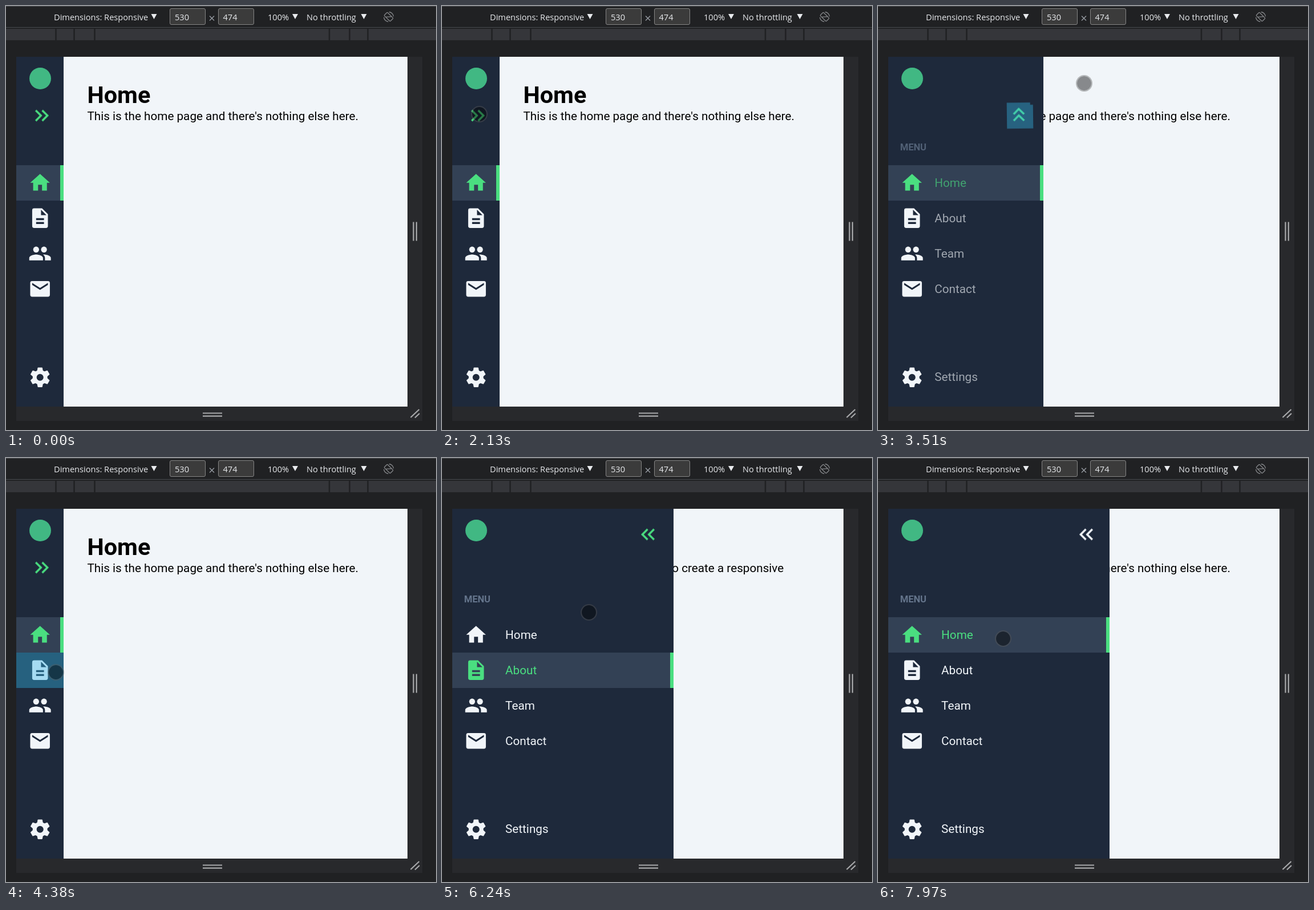
An HTML page that plays this animation: 754x743 px, repeating every 8000 ms.

```html
<!DOCTYPE html>
<html lang="en">
<head>
<meta charset="utf-8">
<title>Responsive sidebar</title>
<style>
@property --open { syntax: "<number>"; inherits: true; initial-value: 0; }
@property --turn { syntax: "<number>"; inherits: true; initial-value: 0; }
@property --label { syntax: "<number>"; inherits: true; initial-value: 0; }

html, body { margin: 0; width: 100%; height: 100%; overflow: hidden; background: #202123; }
.stage {
  position: relative; width: 754px; height: 743px; overflow: hidden;
  font: 20.7px/24px Roboto, sans-serif;
  animation: open 8s ease-in-out infinite,
             turn 8s cubic-bezier(.333, .4, .667, .77) infinite,
             label 8s ease-in-out infinite;
}
.stage * { box-sizing: border-box; }
.chrome { position: absolute; left: 0; top: 0; font: 14.6px "Open Sans", sans-serif; fill: #e8eaed; }

.page { position: absolute; left: 18px; top: 89px; width: 686px; height: 612.5px; background: #f1f5f9; color: #000; overflow: hidden; }
.view { position: absolute; left: 124.4px; top: 43px; white-space: nowrap; }
.view h1 { margin: 0; font-size: 41.4px; line-height: 48px; }
.view p { margin: .5px 0 0; }
.first-view { animation: first-view 8s step-end infinite; }
.second-view { animation: second-view 8s step-end infinite; }

.sidebar {
  position: absolute; left: 0; top: 0; height: 100%;
  width: calc(82.8px + 305.5px * var(--open));
  background: #1e293b; color: #f1f5f9; overflow: hidden;
}
.logo { position: absolute; left: 22.5px; top: 19px; width: 38px; height: 38px; border-radius: 50%; background: #41b883; }
.label { position: absolute; left: 20.7px; top: 147px; font-size: 16.5px; font-weight: 700; color: #64748b; opacity: var(--label); }
.row {
  position: absolute; left: 0; width: 100%; height: 62.1px; padding-left: 20.7px;
  display: flex; align-items: center; white-space: nowrap; border-right: 6px solid transparent;
}
.row svg { flex: none; width: 41.4px; height: 41.4px; fill: currentColor; }
.row span { margin-left: calc(31px * var(--open)); opacity: var(--open); }
.row::after { content: ""; position: absolute; inset: 0 -6px 0 0; background: #33b5e5; opacity: 0; }
.first-row { animation: first-row 8s ease-out infinite; }
.second-row { animation: second-row 8s ease-out infinite; }
.first-row::after { animation: first-tap 8s step-end infinite; }
.second-row::after { animation: second-tap 8s step-end infinite; }

.toggle {
  position: absolute; right: 18.4px; width: 46px; height: 46px; margin-top: -23px; overflow: visible;
  transform: rotate(calc(-180deg * var(--turn)));
  animation: lift 8s step-end infinite;
}
.chevrons { animation: hover 8s ease-out infinite; }
.toggle .tap { fill: #33b5e5; opacity: 0; animation: toggle-tap 8s step-end infinite; }

.cursor {
  position: absolute; left: -14.5px; top: -14.5px; width: 29px; height: 29px; border-radius: 50%;
  background: rgba(0, 0, 0, .44); background-clip: padding-box; border: 2.5px solid rgba(90, 90, 90, .4);
  animation: cursor 8s ease-in-out infinite, appear 8s step-end infinite;
}

@keyframes open {
  0%, 27.425% { --open: 0; } 29.925%, 42.815% { --open: 1; }
  45.315%, 66.735% { --open: 0; } 69.235%, 100% { --open: 1; }
}
@keyframes turn {
  0%, 27.425% { --turn: 0; } 29.925%, 42.8% { --turn: 1; }
  45.3%, 66.75% { --turn: 0; } 69.25%, 100% { --turn: 1; }
}
@keyframes label {
  0%, 27.425% { --label: 0; } 30.55%, 42.8% { --label: 1; }
  45.925%, 66.75% { --label: 0; } 69.875%, 100% { --label: 1; }
}
@keyframes lift { 0% { top: 105px; } 27.425% { top: 43px; } 42.8% { top: 105px; } 66.75%, 100% { top: 43px; } }
@keyframes hover {
  0%, 55%, 68.1%, 94% { fill: #4ade80; transform: translateX(4px); }
  57.5%, 66.2%, 96.5%, 100% { fill: #f1f5f9; transform: translateX(0); }
}
@keyframes toggle-tap {
  0%, 29.4%, 44.9%, 69%, 100% { opacity: 0; }
  27.4%, 42.7%, 66.77% { opacity: .4; }
}
@keyframes first-tap { 0%, 96%, 100% { opacity: 0; } 93.75% { opacity: .4; } }
@keyframes second-tap { 0%, 56.8%, 100% { opacity: 0; } 54.5% { opacity: .4; } }
@keyframes first-row {
  0%, 55%, 96.5%, 100% { background: #334155; color: #4ade80; border-color: #4ade80; }
  57.5%, 94% { background: #1e293b; color: #f1f5f9; border-color: #1e293b; }
}
@keyframes second-row {
  0%, 55%, 96.5%, 100% { background: #1e293b; color: #f1f5f9; border-color: #1e293b; }
  57.5%, 94% { background: #334155; color: #4ade80; border-color: #4ade80; }
}
@keyframes first-view { 0%, 94%, 100% { opacity: 1; } 55% { opacity: 0; } }
@keyframes second-view { 0%, 94%, 100% { opacity: 0; } 55% { opacity: 1; } }
@keyframes appear { 0% { opacity: 0; } 2.375%, 100% { opacity: 1; } }
@keyframes cursor {
  0%, 2.375% { transform: translate(449px, 714px); animation-timing-function: ease-out; }
  12.25% { transform: translate(116px, 320px); animation-timing-function: linear; }
  14.125% { transform: translate(110px, 298px); animation-timing-function: linear; }
  18.75% { transform: translate(56px, 208px); }
  22.5% { transform: translate(65px, 187px); }
  22.875%, 30.6% { transform: translate(65px, 189px); }
  39.4%, 45% { transform: translate(361px, 135px); animation-timing-function: ease-in; }
  46.6% { transform: translate(345px, 153px); animation-timing-function: ease-out; }
  53.75%, 56.6% { transform: translate(87px, 375px); }
  62.5% { transform: translate(68px, 156px); }
  66.75%, 69.75% { transform: translate(67px, 195px); }
  76.4%, 77.9% { transform: translate(257px, 270px); }
  84.5%, 86.25% { transform: translate(365px, 146px); }
  90.25%, 96.25% { transform: translate(204px, 317px); }
  99.6%, 100% { transform: translate(219px, 316px); }
}
</style>
</head>
<body>
<div class="stage">
  <svg class="chrome" width="754" height="743">
    <path fill="#202123" d="M0 0H754V743H0z"/>
    <path fill="#494c50" d="M0 0H754V1H0zM0 37H754V38H0z"/>
    <path fill="#35363a" d="M0 40H754V60H0z"/>
    <path stroke="#202123" stroke-width="2.5" d="M87.5 40v20M119.5 40v20M155.5 40v20M567 40v20M602.5 40v20M634.5 40v20"/>
    <path fill="#28292c" d="M18 89H730V727H18z"/>
    <text x="84" y="25">Dimensions: Responsive</text>
    <g fill="#3b3b3b" stroke="#858585">
      <rect x="287.5" y="4.5" width="62" height="28" rx="2.5"/>
      <rect x="372.5" y="4.5" width="62" height="28" rx="2.5"/>
    </g>
    <text x="296" y="25">530</text>
    <text x="380.5" y="25">474</text>
    <path stroke="#9aa0a6" stroke-width="1.3" d="M357 17.5l8 8m0-8l-8 8"/>
    <text x="459" y="25">100%</text>
    <text x="527" y="25">No throttling</text>
    <path d="M254.5 14h10l-5 9zM502 14h10l-5 9zM622.5 14h10l-5 9z"/>
    <g transform="translate(671 19) rotate(-45)" fill="none" stroke="#85878a" stroke-width="1.3">
      <rect x="-4" y="-7.5" width="8" height="15" rx="1.5"/>
      <path d="M-4-3.5L4 3.5M-6.5-5.5A8.5 8.5 0 0 0-6.5 5.5M6.5-5.5A8.5 8.5 0 0 1 6.5 5.5"/>
    </g>
    <path stroke="#a8a9ab" stroke-width="2.2" d="M714.5 378.5v33M719.8 378.5v33M345 713.5h34M345 718.7h34M709.5 721l15-14M717 721.5l8-7.5"/>
  </svg>

  <div class="page">
    <div class="view first-view">
      <h1>Home</h1>
      <p>This is the home page and there's nothing else here.</p>
    </div>
    <div class="view second-view">
      <h1>About</h1>
      <p>This is where I learned how to create a responsive<br>sidebar menu.</p>
    </div>

    <div class="sidebar">
      <div class="logo"></div>
      <svg class="toggle" viewBox="-23 -23 46 46">
        <g class="chevrons">
          <path transform="translate(-20.7 -22.7) scale(1.725)" d="M6.41 6 5 7.41 9.58 12 5 16.59 6.41 18l6-6zM13 6l-1.41 1.41L16.17 12l-4.58 4.59L13 18l6-6z"/>
        </g>
        <path class="tap" d="M-20.7-23H24.7V18H20.7V23H-20.7z"/>
      </svg>
      <div class="label">MENU</div>
      <div class="row first-row" style="top:189.5px">
        <svg viewBox="0 0 24 24"><path d="M10 20v-6h4v6h5v-8h3L12 3 2 12h3v8z"/></svg>
        <span>Home</span>
      </div>
      <div class="row second-row" style="top:251.6px">
        <svg viewBox="0 0 24 24"><path d="M14 2H6a2 2 0 0 0-2 2v16a2 2 0 0 0 2 2h12a2 2 0 0 0 2-2V8zm2 16H8v-2h8zm0-4H8v-2h8zm-3-5V3.5L18.5 9z"/></svg>
        <span>About</span>
      </div>
      <div class="row" style="top:313.7px">
        <svg viewBox="0 0 24 24">
          <circle cx="8" cy="8" r="3"/><circle cx="16" cy="8" r="3"/>
          <path d="M8 13c-2.33 0-7 1.17-7 3.5V19h14v-2.5C15 14.17 10.33 13 8 13zM16 13l-.97.05C16.19 13.89 17 15.02 17 16.5V19h6v-2.5C23 14.17 18.33 13 16 13z"/>
        </svg>
        <span>Team</span>
      </div>
      <div class="row" style="top:375.8px">
        <svg viewBox="0 0 24 24"><path d="M20 4H4a2 2 0 0 0-2 2v12a2 2 0 0 0 2 2h16a2 2 0 0 0 2-2V6a2 2 0 0 0-2-2zm0 4-8 5-8-5V6l8 5 8-5z"/></svg>
        <span>Contact</span>
      </div>
      <div class="row" style="top:530.2px">
        <svg viewBox="-12 -12 24 24">
          <defs><path id="tooth" d="M-3-6.5-2.4-9.6Q-2.3-10-1.9-10H1.9Q2.3-10 2.4-9.6L3-6.5z"/></defs>
          <circle r="5.5" fill="none" stroke="currentColor" stroke-width="4"/>
          <use href="#tooth"/>
          <use href="#tooth" transform="rotate(60)"/>
          <use href="#tooth" transform="rotate(120)"/>
          <use href="#tooth" transform="rotate(180)"/>
          <use href="#tooth" transform="rotate(240)"/>
          <use href="#tooth" transform="rotate(300)"/>
        </svg>
        <span>Settings</span>
      </div>
    </div>
  </div>
  <div class="cursor"></div>
</div>
</body>
</html>
```
